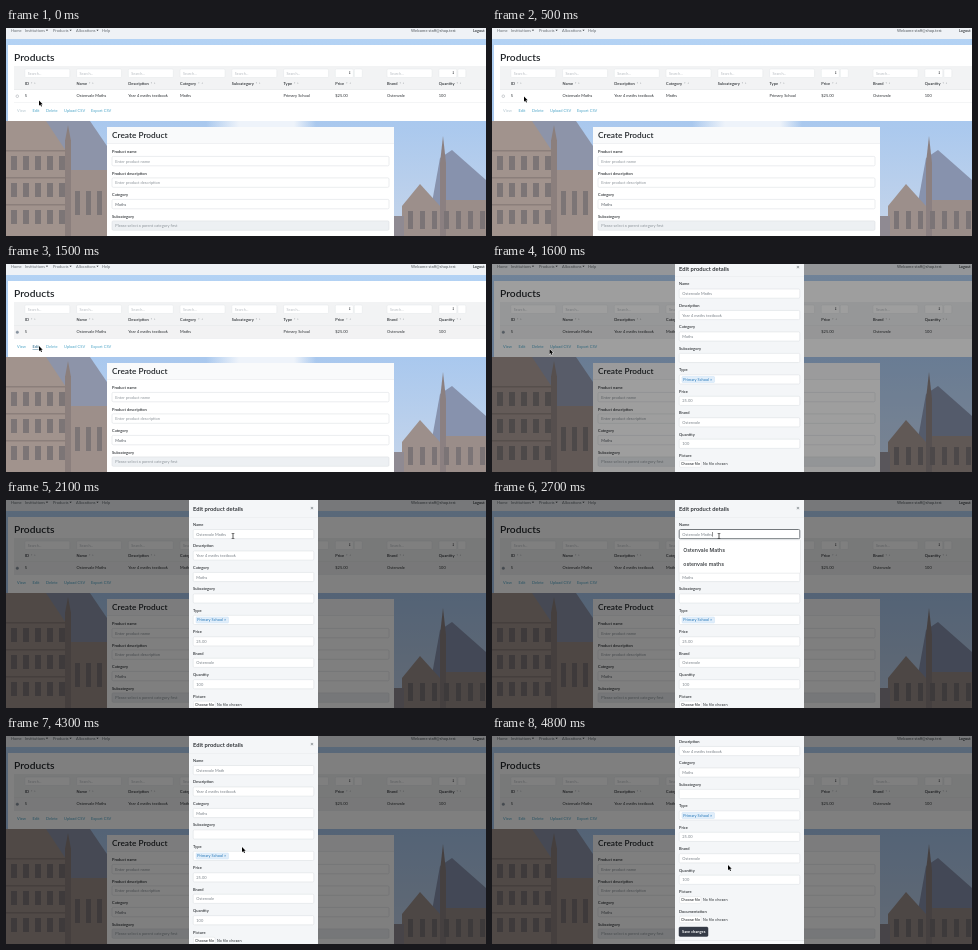
Recreate the animation shown at these times as an HTML page with a canvas. Size 480 by 208 pixels, loop 4.9 s.

```html
<!DOCTYPE html>
<html lang="en">
<head>
<meta charset="utf-8">
<title>Edit product</title>
<style>
html, body { margin: 0; width: 100%; height: 100%; overflow: hidden; }
canvas { display: block; width: 480px; height: 208px; }
</style>
</head>
<body>
<canvas id="stage"></canvas>
<script>
const LOOP = 4900, STEP = 100, W = 480, H = 208;
const canvas = document.getElementById('stage');
const ratio = window.devicePixelRatio || 1;
canvas.width = W * ratio;
canvas.height = H * ratio;
const ctx = canvas.getContext('2d');

const BRAND = 'Ostenvale', PRODUCT = BRAND + ' Maths';
const INK = '#2c3034', MUTED = '#7b8289', BORDER = '#d6dadf', LINK = '#4fa6c8';
const LATO = 'Lato, sans-serif', UI = 'Inter, sans-serif';

function rect(x, y, w, h, fill) {
  ctx.fillStyle = fill;
  ctx.fillRect(x, y, w, h);
}

function poly(fill, ...points) {
  ctx.beginPath();
  for (let i = 0; i < points.length; i += 2) ctx.lineTo(points[i], points[i + 1]);
  ctx.closePath();
  ctx.fillStyle = fill;
  ctx.fill();
}

function box(x, y, w, h, fill = '#fff', stroke = BORDER, line = 0.5, radius = 1.2) {
  ctx.beginPath();
  ctx.roundRect(x, y, w, h, radius);
  ctx.fillStyle = fill;
  ctx.fill();
  ctx.strokeStyle = stroke;
  ctx.lineWidth = line;
  ctx.stroke();
}

// Text is vertically centred on y; drawn large and scaled down for exact advances.
function text(str, x, y, { size = 4, color = INK, weight = 400, font = LATO } = {}) {
  ctx.save();
  ctx.translate(x, y + size * 0.35);
  ctx.scale(0.1, 0.1);
  ctx.font = `${weight} ${size * 10}px ${font}`;
  ctx.fillStyle = color;
  ctx.fillText(str, 0, 0);
  const width = ctx.measureText(str).width / 10;
  ctx.restore();
  return x + width;
}

const label = (str, x, y) => text(str, x, y, { weight: 600 });
const title = (str, x, y, size) => text(str, x, y, { size, weight: 600, color: '#202428' });

function caretDown(x, y) {
  poly(INK, x, y - 0.6, x + 2.2, y - 0.6, x + 1.1, y + 0.7);
}

// Linear interpolation through [time, x, y] keys.
function along(keys, t) {
  const next = keys.findIndex(k => k[0] > t);
  if (next < 0) return keys[keys.length - 1].slice(1);
  if (next === 0) return keys[0].slice(1);
  const a = keys[next - 1], b = keys[next], p = (t - a[0]) / (b[0] - a[0]);
  return a.slice(1).map((v, i) => v + (b[i + 1] - v) * p);
}

function drawPhoto() {
  const sky = ctx.createLinearGradient(0, 0, 0, H);
  sky.addColorStop(0, '#b5d4f5');
  sky.addColorStop(0.45, '#a9c8ee');
  sky.addColorStop(1, '#c6d5ea');
  rect(0, 0, W, H, sky);
  const cloud = ctx.createLinearGradient(200, 0, 310, 0);
  cloud.addColorStop(0, '#eef3fa00');
  cloud.addColorStop(0.3, '#eef3fa');
  cloud.addColorStop(0.8, '#eef3fa');
  cloud.addColorStop(1, '#eef3fa00');
  rect(200, 93, 110, 6, cloud);

  // Left wing
  poly('#8d94a9', 0, 93, 84, 93, 101, 118, 101, 208, 0, 208);
  poly('#a1938d', 0, 93, 40, 93, 62, 126, 62, 208, 0, 208);
  rect(62, 142, 39, 66, '#9d8f8a');
  rect(59, 112, 6, 96, '#8b7f7d');
  poly('#8b7f7d', 59, 113, 62, 97, 65, 113);
  for (let y = 128; y < 208; y += 27) {
    rect(0, y - 6, 60, 1.5, '#8b7f7b');
    for (let x = 5; x < 56; x += 12) rect(x, y, 6, 14, '#7c7576');
  }
  for (let x = 69; x < 101; x += 11) rect(x, 163, 5, 24, '#7c7576');

  // Right wing
  poly('#8792ad', 434, 130, 446, 122, 480, 152, 480, 208, 420, 208);
  poly('#9c8f8b', 396, 208, 396, 178, 414, 156, 434, 178, 434, 208);
  poly('#8b8081', 434, 208, 434, 135, 437, 108, 440, 135, 440, 208);
  rect(440, 172, 40, 36, '#9a8d89');
  rect(388, 188, 10, 20, '#8f8a92');
  for (let x = 402; x < 478; x += 12) rect(x, 183, 5, 18, '#7b7476');
}

function drawNav() {
  rect(0, 0, W, 11, '#eff2f6');
  const items = [['Home', 5], ['Institutions', 19, 1], ['Products', 47, 1], ['Allocations', 70, 1], ['Help', 96]];
  for (const [name, x, menu] of items) {
    const end = text(name, x, 2.3, { color: '#666c72' });
    if (menu) caretDown(end + 1, 2.3);
  }
  text('Welcome staff@shop.test', 405, 2.3, { color: '#50565b' });
  text('Logout', 467, 2.3, { weight: 600, size: 3.8 });
}

function drawProducts(selected, hoverEdit) {
  rect(2, 17, 478, 76, '#fff');
  title('Products', 8, 29.5, 10.3);
  rect(8, 38, 472, 23.5, '#f2f3f4');
  const columns = [
    ['ID', '5'], ['Name', PRODUCT], ['Description', 'Year 4 maths textbook'],
    ['Category', 'Maths'], ['Subcategory', ''], ['Type', 'Primary School'],
    ['Price', '$25.00'], ['Brand', BRAND], ['Quantity', '100']
  ];
  if (selected) rect(8, 62, 472, 12.5, '#f2f2f3');
  const filterBox = (x, w) => box(x, 41, w, 8.5, '#fff', '#e3e6e9');
  columns.forEach(([name, value], i) => {
    const x = 18.8 + i * 51.75;
    if (name === 'Price' || name === 'Quantity') {
      filterBox(x, 18);
      text('↕', x + 13, 45.2, { size: 3.6, font: 'DejaVu Sans, sans-serif' });
      filterBox(x + 19, 8);
    } else {
      filterBox(x, 45);
      text('Search...', x + 3, 45.3, { color: '#b6bbc0', size: 3.7 });
    }
    const end = label(name, x, 55.2);
    text('↑ ↓', end + 1.5, 55.2, { size: 2.8, color: '#a0a5aa', font: 'DejaVu Sans, sans-serif' });
    text(value, x, 67.8);
  });
  rect(8, 61.3, 472, 0.5, '#dde0e3');
  rect(8, 74.5, 472, 0.4, '#e4e6e9');

  ctx.beginPath();
  ctx.arc(11.3, 68.2, 1.3, 0, 7);
  ctx.lineWidth = 0.5;
  ctx.strokeStyle = '#9aa1a7';
  ctx.stroke();
  if (selected) {
    ctx.fillStyle = '#8793a0';
    ctx.fill();
  }

  const links = [['View', 11], ['Edit', 26.5], ['Delete', 40], ['Upload CSV', 58], ['Export CSV', 85]];
  links.forEach(([name, x], i) => {
    const hover = hoverEdit && name === 'Edit';
    const color = hover ? '#1c5f83' : i < 1 && !selected ? '#b4c6cf' : LINK;
    const end = text(name, x, 83, { color });
    if (hover) rect(x, 85, end - x, 0.4, color);
  });
}

function drawCreateForm() {
  rect(101, 99, 287, 109, '#fff');
  rect(101, 99, 287, 16.5, '#f9fafb');
  rect(101, 115.3, 287, 0.5, '#e2e5e8');
  title('Create Product', 106, 107.2, 8.3);
  const fields = [
    ['Product name', 'Enter product name'], ['Product description', 'Enter product description'],
    ['Category', 'Maths'], ['Subcategory', 'Please select a parent category first']
  ];
  fields.forEach(([name, value], i) => {
    const y = 123.6 + i * 21.5;
    label(name, 106, y);
    box(106, y + 4.8, 277, 9.4, i === 3 ? '#edf0f3' : '#fff');
    text(value, 109.3, y + 9.6, { color: i === 2 ? '#555c63' : '#8f969c' });
  });
}

function fileInput(y) {
  box(187.5, y - 3.3, 21.5, 6.6, '#fff', '#d9dcdf', 0.4);
  text('Choose file', 189, y, { size: 3.5, font: UI, weight: 500 });
  text('No file chosen', 211, y, { size: 3.6, font: UI });
}

function drawModal(t, offset) {
  const open = t >= 2500 && t < 4300;
  const name = t >= 3400 ? PRODUCT.slice(0, -1) : PRODUCT;
  rect(183, 0, 129, H, '#f4f6f8');
  ctx.save();
  ctx.translate(0, offset);
  title('Edit product details', 187, 9, 5.85);
  text('×', 304.3, 7.8, { size: 6, weight: 700, color: '#777e84' });
  rect(183, 17, 129, 0.4, '#e2e5e8');

  const fields = [
    ['Name', name], ['Description', 'Year 4 maths textbook'], ['Category', 'Maths'], ['Subcategory', ''],
    ['Type', ''], ['Price', '25.00'], ['Brand', BRAND], ['Quantity', '100']
  ];
  fields.forEach(([caption, value], i) => {
    const y = 24.5 + i * 21.45, focused = open && i === 0;
    label(caption, 187, y);
    box(187.2, y + 5, 120.6, 9.2, '#fff', focused ? '#666b70' : BORDER, focused ? 0.9 : 0.5);
    const end = text(value, 190.3, y + 9.8, { color: MUTED });
    if (focused && (t < 3000 || t >= 3400)) rect(end + 0.2, y + 7.5, 0.5, 4.6, '#222');
    if (caption === 'Type') {
      box(190, y + 6.7, 32.5, 6, '#e1eefa', '#c3dcf2', 0.4, 0.8);
      text('Primary School ×', 191.3, y + 9.7, { color: '#2677b8', size: 3.9 });
    }
  });
  label('Picture', 187, 196.2);
  fileInput(204.5);
  label('Documentation', 187, 215.6);
  fileInput(224);
  box(187, 231.6, 29, 9.3, '#343a46', '#343a46');
  text('Save changes', 190, 236.3, { color: '#fff', size: 3.95, weight: 700 });
  rect(183, 245, 129, 0.5, '#d9dde1');

  if (open) {
    box(187, 39.8, 121.5, 33.4, '#fff', '#d8dadd', 0.5, 0.8);
    text(PRODUCT, 191.3, 50, { size: 5.2, font: UI, weight: 500 });
    text(PRODUCT.toLowerCase(), 191.3, 64, { size: 5.2, font: UI, weight: 500 });
  }
  ctx.restore();
}

const pointerPath = [
  [0, 33, 72.5], [500, 32, 68.5], [600, 32, 68.5], [900, 11.5, 68], [1000, 11.5, 68],
  [1300, 33, 82], [1500, 33, 82], [1600, 57.5, 85], [1800, 190, 48], [2000, 227, 36],
  [3800, 227, 36], [4100, 236, 108], [4300, 236, 111], [4500, 236, 112], [4800, 236, 129]
];
const modalOffset = [[1600, -4.5], [1700, -1], [1800, 0], [4500, 0], [4600, -14], [4700, -32], [4800, -40.5]];
const backdropFade = [[1600, 0.38], [1800, 0.5]];

function drawPointer(t) {
  if (t >= 3300 && t < 3800) return;
  const [x, y] = along(pointerPath, t);
  ctx.save();
  ctx.translate(x, y);
  if (t >= 1900 && t <= 3800) {
    rect(-0.4, -2.6, 0.8, 5.2, '#333');
    rect(-1.4, -3, 2.8, 0.6, '#333');
    rect(-1.4, 2.4, 2.8, 0.6, '#333');
  } else {
    ctx.beginPath();
    for (const [px, py] of [[0, 0], [0, 5.2], [1.2, 4.1], [2.1, 6.1], [3, 5.7], [2.1, 3.8], [3.7, 3.7]]) ctx.lineTo(px, py);
    ctx.closePath();
    ctx.strokeStyle = '#fff';
    ctx.lineWidth = 0.8;
    ctx.stroke();
    ctx.fillStyle = '#000';
    ctx.fill();
  }
  ctx.restore();
}

function draw(t) {
  ctx.setTransform(ratio, 0, 0, ratio, 0, 0);
  drawPhoto();
  drawNav();
  drawProducts(t >= 1000, t >= 1300 && t < 1600);
  drawCreateForm();
  if (t >= 1600) {
    rect(0, 0, W, H, `rgba(0,0,0,${along(backdropFade, t)})`);
    drawModal(t, along(modalOffset, t)[0]);
  }
  drawPointer(t);
}

function tick() {
  draw(Math.floor(performance.now() % LOOP / STEP) * STEP);
  requestAnimationFrame(tick);
}
tick();
</script>
</body>
</html>
```
